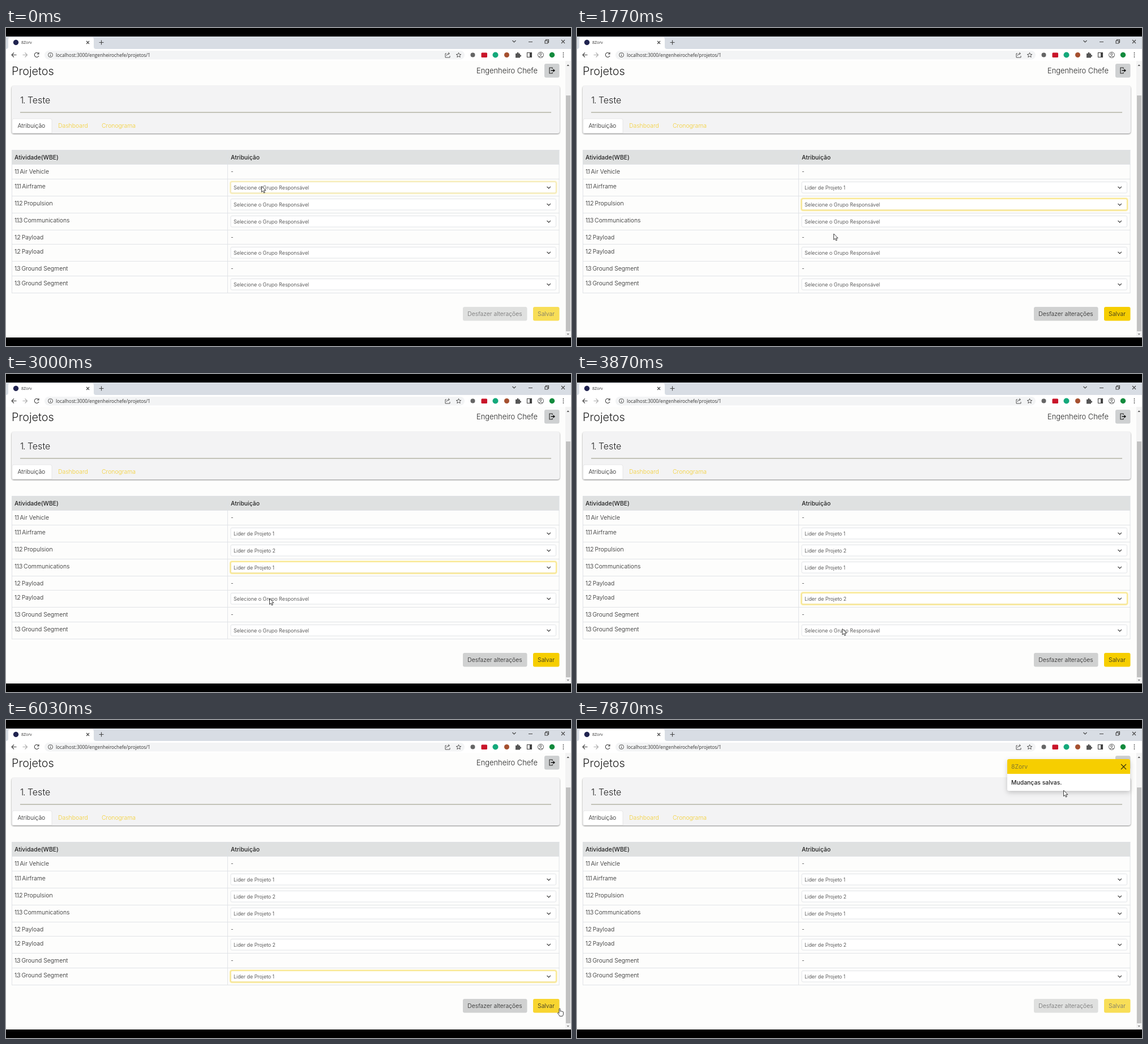
Animation of 998x561 px, one loop 8000 ms. Source, as an HTML page:

```html
<!DOCTYPE html>
<html lang="pt">
<head>
<meta charset="utf-8">
<style>
  html, body { margin: 0; width: 100%; height: 100%; overflow: hidden; background: #000; }
  svg { display: block; width: 100vw; height: 100vh; }
  text { font: 300 10.4px Inter, sans-serif; fill: #222; }
  .strong { font-weight: 500; }
  .small { font-size: 9px; fill: #333; }
  .mid { text-anchor: middle; }
  .num { letter-spacing: -1.2px; }
  .chrome { font: 8.3px "Open Sans", sans-serif; fill: #333; }
  .line { fill: none; stroke: #444; stroke-width: 1.1; }
  .shadow { filter: drop-shadow(0 1.5px 1.3px #0007); }
  .cursor { fill: #fff; stroke: #111; stroke-width: .8; stroke-linejoin: round; }
</style>
</head>
<body>
<svg id="stage" viewBox="0 0 998 561" xmlns="http://www.w3.org/2000/svg"></svg>
<script>
const LOOP = 8000, FADE = 150;

const rect = (x, y, w, h, fill, extra = '') =>
  `<rect x="${x}" y="${y}" width="${w}" height="${h}" fill="${fill}" ${extra}/>`;
const line = (d, extra = '') => `<path class="line" d="${d}" ${extra}/>`;
const dot = (x, y, r, fill) => `<circle cx="${x}" cy="${y}" r="${r}" fill="${fill}"/>`;
const text = (x, y, str, cls = '', extra = '') =>
  `<text x="${x}" y="${y}" class="${cls}" ${extra}>${str.replace(/^(\d[\d.]*)(?= )/, '<tspan class="num">$1</tspan>')}</text>`;

const BRAND = '8Zorv';
const rows = [
  [240, '1.1 Air Vehicle'], [266, '1.1.1 Airframe', 1], [296, '1.1.2 Propulsion', 1],
  [326, '1.1.3 Communications', 1], [356, '1.2 Payload'], [381, '1.2 Payload', 1],
  [411, '1.3 Ground Segment'], [437, '1.3 Ground Segment', 1]
];
// focus time, blur time, time of choice, chosen leader
const selects = [
  { focus: -90, blur: 795, set: 490, leader: 1 },
  { focus: 795, blur: 2120, set: 1840, leader: 2 },
  { focus: 2120, blur: 3080, set: 2560, leader: 1 },
  { focus: 3080, blur: 4200, set: 3720, leader: 2 },
  { focus: 4200, blur: 6150, set: 4850, leader: 1 }
];
const SAVED = 6180;
// time, x, y of the pointer
const path = [
  [0, 451, 279], [120, 451, 279], [440, 451, 306], [560, 451, 306], [760, 451, 317],
  [930, 451, 317], [1500, 453, 363], [1860, 453, 363], [2070, 457, 340], [2180, 457, 340],
  [2480, 459, 373], [2600, 459, 373], [2920, 465, 396], [3130, 465, 396], [3560, 467, 448],
  [3760, 467, 448], [4100, 472, 454], [4260, 472, 454], [4640, 475, 477], [4900, 475, 477],
  [5430, 966, 507], [5630, 966, 507], [5950, 977, 509], [6770, 975, 508], [6870, 846, 164],
  [7300, 846, 164], [7470, 806, 157], [7800, 806, 157], [7870, 859, 124], [LOOP, 859, 124]
];

function browser() {
  return rect(0, 15, 998, 531, '#fdfdfc') + rect(0, 15, 998, 22, '#d8dde4') +
    '<path d="M0 37Q4 37 4 33V20Q4 16 8 16H151Q155 16 155 20V33Q155 37 159 37V58H0Z" fill="#fff"/>' +
    rect(0, 37, 998, 21, '#fff') + rect(68, 40, 742, 15.5, '#f3f4f5', 'rx="7.7"') +
    dot(17.5, 25.5, 4.7, '#20234f') +
    text(27, 28, BRAND, 'chrome', 'style="font-size:7px"') +
    line('M142 23l5 5m0-5l-5 5M168.500 21.500v8m-4-4h8') +
    line('M894.500 22l3 3 3-3M923 24.500h7M952 22.500h5v4.500h-5zM953.500 22v-1.500h5v5h-1.500M981 21l6 6m0-6l-6 6') +
    line('M18.500 47.500h-8.500m4-4l-4 4 4 4M57.500 45a4 4 0 1 0 .5 4m0-6v3h-3.200') +
    line('M29.500 47.500h8m-4-4l4 4-4 4', 'style="stroke:#aaa"') +
    line('M82.500 47.500a4 4 0 1 1-8 0 4 4 0 1 1 8 0M78.500 47v3m0-5v1', 'style="stroke-width:.9"') +
    text(88, 50.5, 'localhost:3000/engenheirochefe/projetos/1', 'chrome') +
    line('M778 45h-2v7h8v-3M778 49q1-4 5-4m-2-2l2.500 2-2.500 2', 'style="stroke-width:.9"') +
    line('M799.500 43.500l1.200 2.800 3.100.2-2.400 2 .8 3-2.700-1.700-2.700 1.700.8-3-2.400-2 3.100-.2z', 'style="stroke-width:.9"') +
    dot(824.5, 47.5, 4, '#666') + rect(839.5, 43.5, 10.5, 8.500, '#c9152a', 'rx="1.500"') +
    dot(864.5, 47.500, 5, '#14a97b') + dot(884.5, 47.500, 4.5, '#a5502f') +
    '<path d="M900 45h2.500a1.600 1.600 0 1 1 3 0h2.500v2.500a1.600 1.600 0 1 1 0 3v2h-8z" fill="#555"/>' +
    line('M920.500 43.500h8v8h-8z') + rect(925, 43.500, 3.500, 8, '#444') +
    line('M949.500 47.500a5 5 0 1 1-10 0 5 5 0 1 1 10 0M946 46a1.700 1.700 0 1 1-3.400 0 1.700 1.700 0 1 1 3.400 0M941 51q3.500-3 7 0', 'style="stroke-width:.9"') +
    dot(964.5, 47.500, 4.700, '#138a3d') + [44, 47.5, 51].map(y => dot(984.5, y, .9, '#444')).join('') +
    rect(988, 58, 10, 488, '#f3f3f3') + rect(989, 119, 8, 416, '#c1c1c1') +
    '<path d="M990.500 67h4.500l-2.250-2.700z" fill="#555"/><path d="M990.500 539h4.500l-2.250 2.700z" fill="#888"/>';
}

function header() {
  return text(10, 82.5, 'Projetos', '', 'style="font-size:19.800px"') +
    text(831, 80, 'Engenheiro Chefe', '', 'style="font-size:12.900px"') +
    rect(951, 63, 26.5, 24.5, '#ced0d1', 'rx="3"') +
    line('M965 72v-2h-5v10h5v-2', 'style="stroke:#222"') +
    '<path d="M962.500 74.300h4v-2.300l3.500 3-3.500 3v-2.300h-4z" fill="#111"/>' +
    `<g class="shadow">${rect(10, 102, 968, 84, '#f3f3f4', 'rx="4"')}</g>` +
    text(25, 133, '1. Teste', '', 'style="font-size:16px"') +
    rect(25, 148.4, 938, 1, '#93937f') +
    '<path d="M11 185.500V163Q11 160 14 160H78Q81 160 81 163V185.500Z" fill="#fff" stroke="#e2e2e2" stroke-width=".8"/>' +
    text(20.5, 175.5, 'Atribuição') +
    text(92, 175.5, 'Dashboard', '', 'style="fill:#f3cf32"') +
    text(169, 175.5, 'Cronograma', '', 'style="fill:#f3cf32"');
}

function table() {
  let out = rect(10, 215, 967, 25.5, '#dfe1e1') +
    text(15, 231.5, 'Atividade(WBE)', 'strong') + text(397, 231.5, 'Atribuição', 'strong');
  let n = 0;
  for (const [y, label, hasSelect] of rows) {
    out += text(15, y + 17, label);
    if (!hasSelect) { out += text(397, y + 16.5, '-'); continue; }
    const top = y + 5.5;
    out += rect(397, top, 574.5, 19.5, '#fff', 'rx="2" stroke="#dfe1e5" stroke-width=".9"') +
      `<g id="focus${n}">${rect(396, top - 1, 576.5, 21.5, 'none', 'rx="3" stroke="#f6ce00" stroke-opacity=".3" stroke-width="2.500"')}` +
      `${rect(397, top, 574.5, 19.5, 'none', 'rx="2" stroke="#f9e37a"')}</g>` +
      text(402, top + 13, '', 'small', `id="value${n}"`) +
      line(`M955.500 ${top + 8.3}l3.200 3.200 3.200-3.200`, 'style="stroke:#333"');
    n++;
  }
  const edges = [215, ...rows.map(r => r[0]), 467];
  return out + `<path d="${edges.map(y => `M10 ${y + .5}H977.500`).join('')}M10.500 215V467.500M391.500 215V467.500M977 215V467.500" fill="none" stroke="#dee1e5" stroke-width=".9"/>`;
}

function buttons() {
  return `<g id="actions">${rect(807, 492, 113.5, 24.5, '#d0d1d1', 'rx="3"')}` +
    text(863.5, 508, 'Desfazer alterações', 'mid') +
    rect(931, 492, 46.5, 24.5, '#f6ce00', 'rx="3" id="save"') +
    text(954, 508, 'Salvar', 'mid') + '</g>';
}

function toast() {
  return '<g id="toast"><g style="filter:drop-shadow(0 3px 4px #0003)">' +
    rect(760, 69, 217, 56, '#fff', 'rx="3"') + '</g>' +
    '<path d="M760 95V72Q760 69 763 69H974Q977 69 977 72V95Z" fill="#f6ce00"/>' +
    text(767, 86, BRAND, '', 'style="fill:#85782c;font-weight:400"') +
    line('M961 78l9 9m0-9l-9 9', 'style="stroke:#3b3510;stroke-width:1.300"') +
    text(767, 114, 'Mudanças salvas.', 'strong') + '</g>';
}

const pointers =
  '<g id="pointer"><path id="arrow" class="cursor" d="M.5 0V10.500L2.900 8.300 4.500 12 6.300 11.200 4.700 7.700H8Z"/>' +
  '<path id="hand" class="cursor" d="M0 .5Q1-.8 2 .5V5Q3 4 4 5 5 4.300 6 5.500 7.500 5 7.500 7V10Q7.300 12 6 13.500H1Q0 11-2.500 8.500-2.500 7-1 7.500L0 8.500Z"/></g>';

document.getElementById('stage').innerHTML =
  browser() + header() + table() + buttons() + toast() + pointers;

const $ = id => document.getElementById(id);
const ramp = (t, start) => Math.min(1, Math.max(0, (t - start) / FADE));

function pointerAt(t) {
  const i = path.findIndex(p => p[0] > t);
  const [t0, x0, y0] = path[i - 1], [t1, x1, y1] = path[i];
  const u = (t - t0) / (t1 - t0), k = u * u * (3 - 2 * u);
  return [x0 + (x1 - x0) * k, y0 + (y1 - y0) * k];
}

function draw(t) {
  selects.forEach((s, i) => {
    $('focus' + i).setAttribute('opacity', ramp(t, s.focus) - ramp(t, s.blur));
    $('value' + i).textContent = t < s.set ? 'Selecione o Grupo Responsável' : `Lider de Projeto ${s.leader}`;
  });
  const enabled = ramp(t, selects[0].set) - ramp(t, SAVED);
  $('actions').setAttribute('opacity', .65 + .35 * enabled);

  const [x, y] = pointerAt(t);
  const hover = t < SAVED && x >= 931 && x < 978 && y >= 492 && y < 517;
  $('save').setAttribute('fill', hover ? '#f8d530' : '#f6ce00');
  $('pointer').setAttribute('transform', `translate(${x} ${y})`);
  $('arrow').setAttribute('visibility', hover ? 'hidden' : 'visible');
  $('hand').setAttribute('visibility', hover ? 'visible' : 'hidden');
  $('toast').setAttribute('opacity', ramp(t, SAVED + 40));
}

function tick() {
  draw(performance.now() % LOOP);
  requestAnimationFrame(tick);
}
tick();
</script>
</body>
</html>
```
